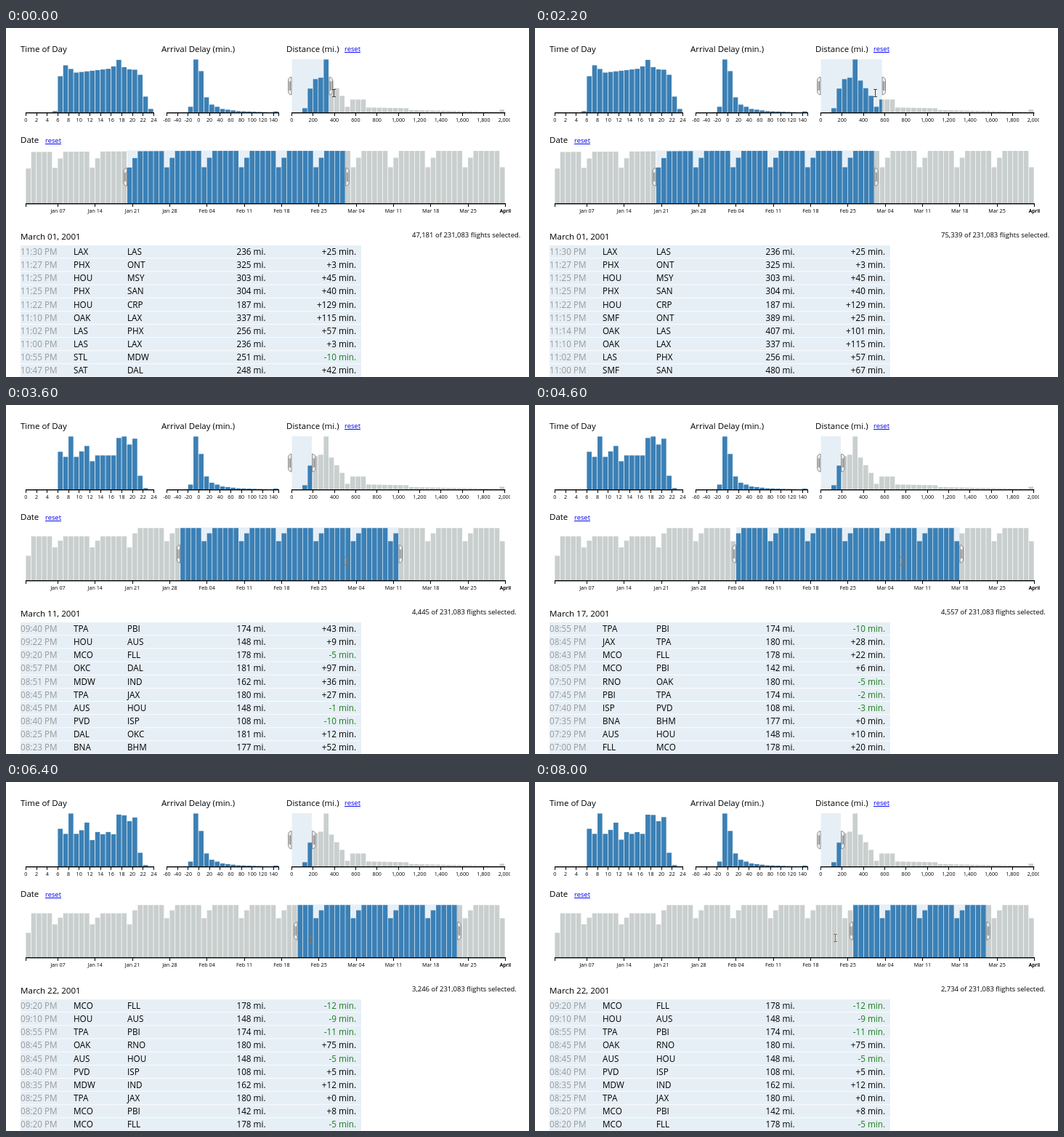
Write an HTML page with a canvas that moves like this. It is 720 px wide and 480 px high and loops after 8.2 s.

```html
<!DOCTYPE html>
<html lang="en">
<head>
<meta charset="utf-8">
<title>Flight filters</title>
<style>
html, body { margin: 0; width: 100%; height: 100%; overflow: hidden; background: #fff; }
canvas, svg { position: absolute; left: 0; top: 0; width: 720px; height: 480px; }
text { font-family: "Open Sans", "Noto Sans", sans-serif; white-space: pre; }
</style>
</head>
<body>
<canvas id="c" width="720" height="480"></canvas>
<svg id="s" viewBox="0 0 720 480"></svg>
<script>
const LOOP = 8200, STEP = 200, SCALE = 22 / 30, UNIT = 10 * SCALE;
const BLUE = '#3b80b5', GRAY = '#c9cfce', PALE = '#e6eff6';
const ctx = document.getElementById('c').getContext('2d');
const svg = document.getElementById('s');

// Piecewise linear curve through [position, value] points.
function at(points, p) {
  if (p <= points[0][0]) return points[0][1];
  for (let i = 1; i < points.length; i++) {
    const [p0, a] = points[i - 1], [p1, b] = points[i];
    if (p <= p1) return a + (b - a) * (p - p0) / (p1 - p0);
  }
  return points[points.length - 1][1];
}
const series = (n, f) => Array.from({ length: n }, (_, i) => f(i));
const blend = (a, b, u) => a.map((v, i) => v + (b[i] - v) * u);
const bell = (x, mid, width) => Math.exp(-(((x - mid) / width) ** 2));

// Histogram shapes, heights in pixels.
const hoursAll = series(24, h => h < 5 ? 0 : at([[5, 2], [6, 50], [7, 65], [9, 55], [16, 61], [20, 59],
  [21, 52], [22, 22], [23, 5]], h) + 12 * bell(h, 17, 0.8));
const hoursShort = series(24, h => at([[5, 0], [6, 52], [7, 45], [9, 45], [11, 60], [12, 39], [13, 47],
  [16, 47], [17, 71], [18, 73], [19, 62], [20, 70], [21, 19], [22, 2], [23, 0]], h) + 28 * bell(h, 8, 0.3));
const hoursLate = hoursShort.map((v, h) => h > 9 && h < 21 ? v + (h % 2 ? 1 : -5) : v);
const delays = tail => series(21, i => i === 5 ? 73 : tail * at([[2, 0], [3, 0.5], [4, 8], [5, 73], [6, 57],
  [7, 21], [8, 11], [10, 5], [13, 2], [19, 0.4], [20, 1.6]], i));
const miles = series(40, i => at([[1, 0], [2, 6], [3, 33], [4, 46], [5, 48], [6, 73], [7, 44], [9, 23],
  [10, 8], [11, 18], [13, 18], [14, 7], [21, 6], [22, 3.5], [38, 1], [39, 4]], i));
const week = (first, sat, sun, work) => series(90, d =>
  work(d) * (!d ? first : d % 7 === 5 ? sat : d % 7 === 6 ? sun : 1));
const datesAll = week(0.68, 0.69, 0.87, d => 71 + Math.min(1.5, d / 20));
const datesShort = week(0.56, 0.75, 0.9, d => d < 20 ? 61 : 72.3);

// Brush edges and flight count by step.
const reach = [[0, 350], [3, 520], [7, 760], [9, 740], [11, 575], [12, 190]];
const from = [[14, 19], [18, 29], [23, 34], [26, 38], [30, 38], [35, 71], [36, 74], [37, 71], [40, 56], [41, 40]];
const to = [[14, 60], [18, 70], [23, 76], [24, 77], [26, 81]];
const total = [[0, 47181], [7, 87000], [11, 75339], [12, 4330], [14, 4330], [18, 4445], [23, 4557],
  [26, 4673], [30, 4673], [35, 1105], [36, 770], [37, 1105], [40, 2734]];

// Flights: time, origin, destination, miles, delay.
const list = s => s.split(',').map(r => r.trim().split(' '));
const byPair = {};
for (const [a, b, mi] of list(`TPA PBI 174, HOU AUS 148, MCO FLL 178, OKC DAL 181, MDW IND 162,
  TPA JAX 180, PVD ISP 108, BNA BHM 177, MCO PBI 142, OAK RNO 180`)) byPair[a + b] = byPair[b + a] = mi;
const short = s => list(s).map(([time, a, b, late]) => [time, a, b, byPair[a + b], late]);

const marchFirst = list(`11:30 LAX LAS 236 +25, 11:27 PHX ONT 325 +3, 11:25 HOU MSY 303 +45,
  11:25 PHX SAN 304 +40, 11:22 HOU CRP 187 +129, 11:15 SMF ONT 389 +25, 11:14 OAK LAS 407 +101,
  11:10 OAK LAX 337 +115, 11:02 LAS PHX 256 +57, 11:00 SMF SAN 480 +67, 11:00 LAS LAX 236 +3,
  10:55 STL MDW 251 -10, 10:47 SAT DAL 248 +42`);
const byDay = {
  70: short(`09:40 TPA PBI +43, 09:22 HOU AUS +9, 09:20 MCO FLL -5, 08:57 OKC DAL +97, 08:51 MDW IND +36,
    08:45 TPA JAX +27, 08:45 AUS HOU -1, 08:40 PVD ISP -10, 08:25 DAL OKC +12, 08:23 BNA BHM +52`),
  76: short(`08:55 TPA PBI -10, 08:45 JAX TPA +28, 08:43 MCO FLL +22, 08:05 MCO PBI +6, 07:50 RNO OAK -5,
    07:45 PBI TPA -2, 07:40 ISP PVD -3, 07:35 BNA BHM +0, 07:29 AUS HOU +10, 07:00 FLL MCO +20`),
  81: short(`09:20 MCO FLL -12, 09:10 HOU AUS -9, 08:55 TPA PBI -11, 08:45 OAK RNO +75, 08:45 AUS HOU -5,
    08:40 PVD ISP +5, 08:35 MDW IND +12, 08:25 TPA JAX +0, 08:20 MCO PBI +8, 08:20 MCO FLL -5`)
};
const pool = Object.values(byDay).flat();
function flights(n, last, far) {
  if (n < 12) return marchFirst.filter(r => r[3] < far).slice(0, 10);
  return byDay[last] || pool.filter((_, i) => (i + last) % 3 === 0)
    .sort((a, b) => b[0].localeCompare(a[0]));
}

function add(tag, attrs) {
  const el = document.createElementNS(svg.namespaceURI, tag);
  for (const k in attrs) el.setAttribute(k, attrs[k]);
  return svg.appendChild(el);
}
function text(x, y, str, size, anchor = 'start', fill = '#000') {
  const el = add('text', { x, y, 'font-size': size, 'text-anchor': anchor, fill });
  el.textContent = str;
  return el;
}

const commas = v => Math.round(v).toLocaleString('en-US');
const months = [['Jan', 31], ['Feb', 28], ['March', 31]];
function dayName(d) {
  let i = 0;
  while (d >= months[i][1]) d -= months[i++][1];
  return [months[i][0], String(d + 1).padStart(2, '0')];
}
function shortDay(d) {
  if (d === 90) return 'April';
  const [month, day] = dayName(d);
  return month.slice(0, 3) + ' ' + day;
}

// A chart has n bins and a labelled tick every few bins.
function makeChart(x, y, n, first, every, label) {
  const ticks = [];
  for (let i = first; i <= n; i += every) ticks.push(i);
  for (const i of ticks) text(x + i * UNIT, y + 85.8, label(i), 7.2, 'middle');
  return { x, y, n, ticks };
}
const hourChart = makeChart(27.4, 43, 24, 0, 2, h => h);
const delayChart = makeChart(221.4, 43, 21, 0, 2, i => i * 10 - 60);
const mileChart = makeChart(393.4, 43, 40, 0, 4, i => commas(i * 50));
add('rect', { x: 694, y: 120, width: 26, height: 12, fill: '#fff' });
const dateChart = makeChart(27.4, 168.2, 90, 6, 7, shortDay);
text(dateChart.x + 90 * UNIT, dateChart.y + 85.8, shortDay(90), 7.2, 'middle');
dateChart.ticks.push(90);

text(20, 32.5, 'Time of Day', 11.5);
text(214, 32.5, 'Arrival Delay (min.)', 11.5);
text(386, 32.5, 'Distance (mi.)', 11.5);
text(20, 158, 'Date', 11.5);
for (const [x, y] of [[466, 32], [54, 158]])
  text(x, y, 'reset', 9.4, 'start', '#00e').setAttribute('text-decoration', 'underline');
const title = text(20, 291, '', 11.6);
const count = text(559, 288, '', 9.5);
const rowY = i => 299 + i * 18.15;
const cells = series(10, i => [[20, 'start', '#999'], [93], [167], [357.5, 'end'], [482, 'end']]
  .map(([x, anchor, fill]) => text(x, rowY(i) + 13, '', 11.7, anchor, fill)));

function bars(heights, color) {
  ctx.fillStyle = color;
  heights.forEach((h, i) => ctx.fillRect(i * 10, 100 - h / SCALE, 9, h / SCALE));
}
function handle(x, side) {
  const sweep = side > 0 ? 1 : 0, y = 100 / 3;
  const p = new Path2D(`M${0.5 * side},${y}A6,6 0 0 ${sweep} ${6.5 * side},${y + 6}V${2 * y - 6}` +
    `A6,6 0 0 ${sweep} ${0.5 * side},${2 * y}ZM${2.5 * side},${y + 8}V${2 * y - 8}` +
    `M${4.5 * side},${y + 8}V${2 * y - 8}`);
  ctx.save();
  ctx.translate(x, 0);
  ctx.fillStyle = '#eee';
  ctx.strokeStyle = '#666';
  ctx.fill(p);
  ctx.stroke(p);
  ctx.restore();
}
function chart(c, heights, brush) {
  ctx.save();
  ctx.translate(c.x, c.y);
  ctx.scale(SCALE, SCALE);
  if (brush) {
    const [a, b] = brush;
    bars(heights, GRAY);
    ctx.save();
    ctx.beginPath();
    ctx.rect(a, 0, b - a, 100);
    ctx.clip();
    ctx.fillStyle = PALE;
    ctx.fillRect(a, 0, b - a, 100);
    bars(heights, BLUE);
    ctx.restore();
    handle(a, -1);
    handle(b, 1);
  } else bars(heights, BLUE);
  ctx.restore();
  ctx.fillStyle = '#000';
  const y = Math.floor(c.y + 73);
  ctx.fillRect(Math.floor(c.x), y, c.n * UNIT + 1, 1.4);
  for (const t of new Set([0, c.n, ...c.ticks])) ctx.fillRect(Math.floor(c.x + t * UNIT), y, 1, 5);
}

// The pointer runs slightly ahead of the edge or window it drags.
function pointer(n) {
  const ahead = n + 0.25;
  if (n <= 12) return [mileChart.x + at(reach, ahead) / 50 * UNIT + 4, 89];
  const left = dateChart.x + at(from, ahead) * UNIT;
  return n < 27 ? [left + 226, 214] : [left + 4, at([[29, 205], [35, 228], [40, 214]], n)];
}
function beam([x, y]) {
  x = Math.round(x) + 0.5;
  y += 0.5;
  ctx.strokeStyle = y > 150 ? '#8d7460' : '#444';
  ctx.lineWidth = 1;
  ctx.beginPath();
  for (const dy of [-5, 5]) {
    ctx.moveTo(x - 2.5, y + dy);
    ctx.lineTo(x + 2.5, y + dy);
  }
  ctx.moveTo(x, y - 5);
  ctx.lineTo(x, y + 5);
  ctx.stroke();
}

function draw(n) {
  const far = at(reach, n), first = Math.round(at(from, n)), last = Math.round(at(to, n));
  const near = n < 12;
  const late = at([[29, 0], [35, 1], [40, 0.4]], n);
  ctx.clearRect(0, 0, 720, 480);
  chart(hourChart, near ? hoursAll : blend(hoursShort, hoursLate, late));
  chart(delayChart, delays(near ? 1 : 0.86));
  chart(mileChart, miles, [0, far / 5]);
  chart(dateChart, near ? datesAll : datesShort, [first * 10, last * 10]);
  ctx.fillStyle = PALE;
  for (let i = 0; i < 10; i++) ctx.fillRect(20, rowY(i), 469, 17.3);
  beam(pointer(n));

  title.textContent = dayName(last - 1).join(' ') + ', 2001';
  count.textContent = commas(at(total, n)) + ' of 231,083 flights selected.';
  const rows = flights(n, last, far);
  cells.forEach((row, i) => {
    const [time, a, b, mi, wait] = rows[i];
    [time + ' PM', a, b, mi + ' mi.', wait + ' min.'].forEach((s, k) => { row[k].textContent = s; });
    row[4].setAttribute('fill', wait[0] === '-' ? '#1a7d1a' : '#000');
  });
}

let shown = 0;
const start = performance.now();
function tick(now) {
  const n = Math.floor(Math.max(0, now - start) % LOOP / STEP);
  if (n !== shown) draw(shown = n);
  requestAnimationFrame(tick);
}
draw(shown);
requestAnimationFrame(tick);
</script>
</body>
</html>
```
